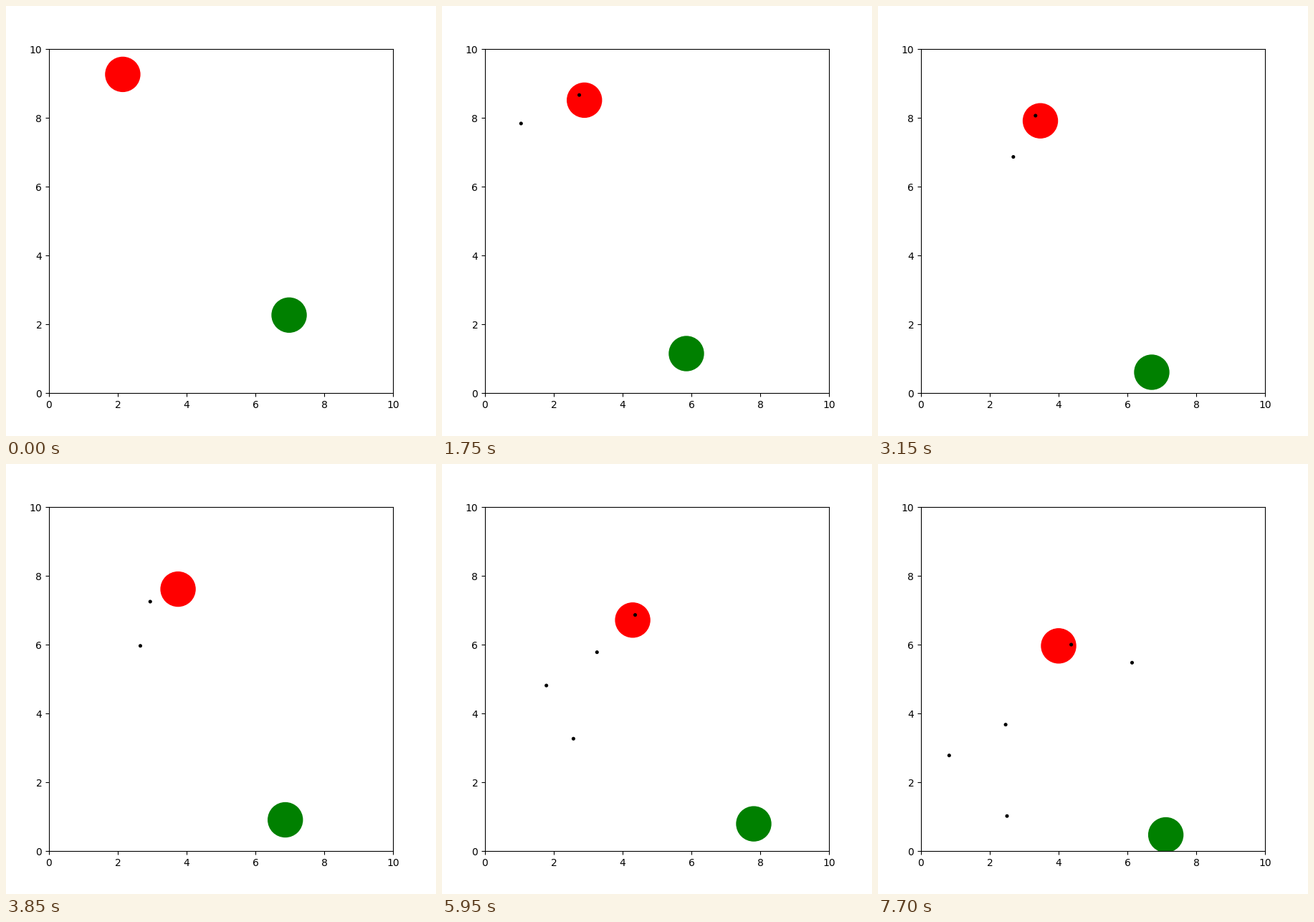
Recreate the animation shown at these times as a matplotlib script. Size 600x600 px, loop 8000 ms.

```python
import numpy as np
import matplotlib.pyplot as plt
from matplotlib.animation import FuncAnimation
from matplotlib.patches import Circle

TICK = 50          # ms per animation frame
HOLD = 7           # animation frames per simulation step
FRAMES = 160
LAST_STEP = 22

SHOT_EVERY = 4     # steps between shots
SHOT_SPEED = 0.45  # axis units per step
SHOT_ANGLES = [-127.5, -91.8, -115.4, -110.7, -38.1, -35.8]

# Turning points: step, x (and y); motion is straight in between.
RED_TURNS = [(0, 2.144), (7, 3.188), (12, 3.892), (15, 4.267),
             (16, 4.365), (19, 4.150), (20, 4.002), (22, 4.000)]
GREEN_TURNS = [(0, 6.980, 2.265), (3, 6.281, 1.583), (5, 5.854, 1.146),
               (9, 6.708, 0.604), (11, 6.869, 0.906), (13, 7.167, 1.025),
               (15, 7.383, 0.983), (17, 7.812, 0.790), (19, 7.502, 0.520),
               (22, 7.117, 0.469)]


def along(turns, step):
    times, *coords = zip(*turns)
    return [np.interp(step, times, c) for c in coords]


def red_pos(step):
    return along(RED_TURNS, step)[0], 9.2625 - 0.15 * step


def shot_pos(k, step):
    """Each shot leaves from where the red disc stood when it fired."""
    fired = k * SHOT_EVERY
    x, y = red_pos(fired)
    angle = np.radians(SHOT_ANGLES[k])
    dist = SHOT_SPEED * (step - fired - 1)
    return x + dist * np.cos(angle), y + dist * np.sin(angle)


fig, ax = plt.subplots(figsize=(6, 6), dpi=100)
fig.subplots_adjust(left=0.1, right=0.9, bottom=0.1, top=0.9)
ax.set_xlim(0, 10)
ax.set_ylim(0, 10)

red = ax.add_patch(Circle((0, 0), 0.5, color="red"))
green = ax.add_patch(Circle((0, 0), 0.5, color="green"))
shots = [ax.add_patch(Circle((0, 0), 0.053, color="black", lw=0, zorder=2))
         for _ in SHOT_ANGLES]


def update(frame):
    step = min(frame // HOLD, LAST_STEP)
    red.center = red_pos(step)
    green.center = along(GREEN_TURNS, step)
    for k, shot in enumerate(shots):
        shot.center = shot_pos(k, step)
        shot.set_visible(step > k * SHOT_EVERY)
    return red, green, *shots


anim = FuncAnimation(fig, update, frames=FRAMES, interval=TICK,
                     repeat=True, repeat_delay=0)
plt.show()
```
